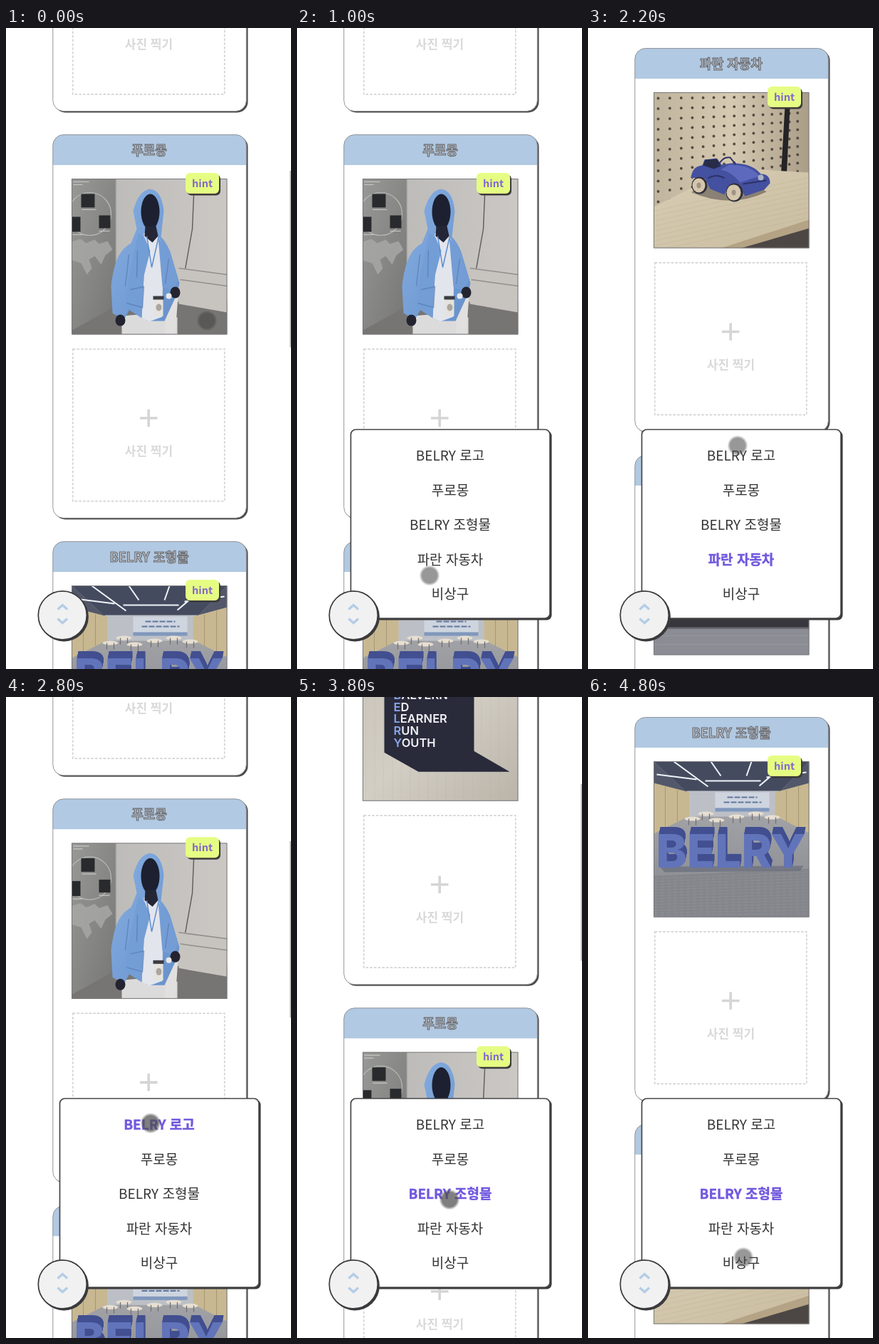
These frames come from a looping animation (400x898 px, 4900 ms). An HTML page:

```html
<!DOCTYPE html>
<html lang="ko">
<head>
<meta charset="utf-8">
<style>
html, body { margin: 0; width: 100%; height: 100%; overflow: hidden; background: #fff; }
svg { display: block; width: 100vw; height: 100vh; }
text { font-family: 'Noto Sans CJK KR', 'Noto Sans CJK', 'Noto Sans', sans-serif; text-anchor: middle; }
.title { font-size: 18px; font-weight: 700; fill: #bcc4ce; stroke: #67676b; stroke-width: 1.1; }
.hint { font-size: 14.5px; font-weight: 700; fill: #8068cf; }
.shoot { font-size: 17px; font-weight: 700; fill: #d9d9d9; }
.item { font-size: 19px; fill: #333; }
.item.on { font-weight: 700; fill: #7259df; stroke: #7259df; stroke-width: .4; }
.board { font: 600 16.5px Inter, sans-serif; fill: #f1f1f4; text-anchor: start; }
.sign { font: 800 65px Inter, sans-serif; }
</style>
</head>
<body>
<svg id="stage" viewBox="0 0 400 898">
  <defs>
    <clipPath id="photo"><rect width="218" height="218"/></clipPath>
    <linearGradient id="wood" x2="1" y2="1"><stop stop-color="#c9c3b8"/><stop offset=".5" stop-color="#d3cec4"/><stop offset="1" stop-color="#bab4a9"/></linearGradient>
    <linearGradient id="wall" x2="1" y2="0"><stop stop-color="#b8b7b5"/><stop offset="1" stop-color="#cbc8c4"/></linearGradient>
    <linearGradient id="greyWall" x2="1" y2="1"><stop stop-color="#989896"/><stop offset="1" stop-color="#767674"/></linearGradient>
    <linearGradient id="hoodie" x2="1" y2="1"><stop stop-color="#86afe3"/><stop offset="1" stop-color="#6690ca"/></linearGradient>
    <linearGradient id="floor" x2="0" y2="1"><stop stop-color="#b0b1b5"/><stop offset="1" stop-color="#85868b"/></linearGradient>
    <linearGradient id="peg" x2="1" y2="0"><stop stop-color="#bfb49d"/><stop offset=".5" stop-color="#d5c9b1"/><stop offset="1" stop-color="#a99d88"/></linearGradient>
    <linearGradient id="shelf" x2="1" y2="1"><stop stop-color="#d8cdb5"/><stop offset="1" stop-color="#c9bc9f"/></linearGradient>
    <radialGradient id="touch"><stop offset=".72" stop-color="#4d4d4d"/><stop offset="1" stop-color="#4d4d4d" stop-opacity="0"/></radialGradient>
  </defs>
  <g id="list"></g>
  <rect id="bar" x="398.3" width="2" height="247.5" fill="#aaa"/>
  <g id="menu">
    <rect x="77.5" y="564.5" width="280" height="265" rx="7" fill="#3b3a3d"/>
    <rect x="75.5" y="562.5" width="279.5" height="264.5" rx="7" fill="#fff" stroke="#454447" stroke-width="1.7"/>
    <g id="items"></g>
  </g>
  <circle cx="81.3" cy="824.8" r="34.6" fill="#3b3a3d"/>
  <circle cx="79.3" cy="822.8" r="34" fill="#f1f1f1" stroke="#3b3a3d" stroke-width="1.7"/>
  <path d="M72.5 814.5l6.8-6 6.8 6M72.5 827.5l6.8 6 6.8-6" fill="none" stroke="#b4cde6" stroke-width="3.4"/>
  <circle id="cursor" r="14.5" fill="url(#touch)"/>
</svg>
<script>
const $ = id => document.getElementById(id);
const range = (n, f) => Array.from({ length: n }, (_, i) => f(i)).join('');
const rect = (x, y, w, h, fill, more = '') => `<rect x="${x}" y="${y}" width="${w}" height="${h}" fill="${fill}" ${more}/>`;
const path = (d, fill, more = '') => `<path d="${d}" fill="${fill}" ${more}/>`;
const line = (d, color, w = 1, more = '') => path(d, 'none', `stroke="${color}" stroke-width="${w}" ${more}`);
const oval = (x, y, rx, ry, fill, more = '') => `<ellipse cx="${x}" cy="${y}" rx="${rx}" ry="${ry}" fill="${fill}" ${more}/>`;
const text = (cls, x, y, s, more = '') => `<text class="${cls}" x="${x}" y="${y}" ${more}>${s}</text>`;

const names = ['BELRY 로고', '푸로몽', 'BELRY 조형물', '파란 자동차', '비상구'];

function boardPhoto() {
  const words = ['BALVERN', 'ED', 'LEARNER', 'RUN', 'YOUTH'];
  return rect(0, 0, 218, 218, 'url(#wood)')
    + range(18, i => line(`M${i * 12.5 + 4} 0v218`, '#b5afa5', .6, 'opacity=".4"'))
    + path('M30 28H156V148L206 177H78L30 150Z', '#292b3b')
    + words.map((w, i) => text('board', 43, 75 + i * 16.8,
        `<tspan fill="#8ba5ec">${w[0]}</tspan>${w.slice(1)}`)).join('');
}

function hoodiePhoto() {
  const squares = [[13, 21, 19, 19], [0, 53, 12, 21], [38, 51, 16, 18]];
  return rect(0, 0, 218, 218, 'url(#wall)')
    + path('M0 208L62 172H218V218H0Z', '#777573')
    + path('M0 0H62V178L0 212Z', 'url(#greyWall)')
    + line('M62 0V176', '#a9a9a7', 1.5)
    + `<circle cx="25" cy="49" r="30" fill="none" stroke="#b9b9b7" stroke-width="1.2"/>`
    + squares.map(q => rect(...q, '#292a2d')).join('')
    + line('M2 4h22M2 8h13M14 43h20M38 73h15M1 78h14', '#c8c8c6', 1.2)
    + path('M0 88l12-4 8 6 12-5 6 6 12-4 7 12-10 8-6 13-9-12-8 5 4 12-7 9-8-16-13-4Z', '#a9aaa7', 'opacity=".8"')
    + line('M172 0L169 70 158 132', '#5d5b5a', 1.4)
    + path('M150 124L218 133V187L150 175Z', '#c7c4bf') + line('M150 125L218 134M152 141L218 150', '#918f8d', 1.5)
    + path('M70 192Q108 187 148 194V218H70Z', '#dcdbdc')
    + path('M134 160L150 150 145 218H130Z', '#e1e0df')
    + path('M91 70L83 90C65 100 59 119 55 150L57 188 73 197 82 181 106 199H130L148 160 151 146 138 102Q132 88 125 81L129 45Q126 15 109 14Q93 17 86 45Z', 'url(#hoodie)')
    + path('M101 76H119L128 94 127 193 108 200 98 194 102 120Z', '#e3e5ec')
    + oval(110, 46, 13, 25, '#1d2030')
    + path('M103 66H118L121 80 113 89 102 80Z', '#242635')
    + path('M93 76L102 82 110 101 101 136 98 195 75 180 79 145Z', '#739dd5')
    + path('M121 82L138 105 149 142 142 157 127 151Z', '#749dd5')
    + line('M80 106L75 150M82 155L101 151 99 180 77 174M136 112L131 147M92 100L91 138', '#5479af', 1.4, 'opacity=".65"')
    + line('M105 80L112 124 122 80', '#5d8dd1', 1.5)
    + rect(115, 165, 13, 27, '#e6e3de') + rect(114, 164, 15, 5, '#3b3b43') + oval(122, 180, 4, 5, '#aaa69e')
    + oval(68, 198, 7, 8, '#232430') + oval(145, 159, 7, 8, '#232430')
    + oval(136, 164, 4, 4, '#e9e9e9');
}

function signPhoto() {
  const depth = range(10, i => text('sign', 110 - i * .2, 138 + i, names[2].slice(0, 5), 'fill="#424f90"'));
  return rect(0, 0, 218, 218, 'url(#floor)')
    + path('M0 0H218L176 43H46Z', '#454b5f') + path('M0 0V34L46 43ZM218 0V34L176 43Z', '#525869')
    + line('M28 0L76 35M80 0L94 20M137 0L130 20M188 0L148 34M4 18L60 25M158 22L214 15M72 27H150', '#eef3fa', 2)
    + rect(46, 41, 130, 36, '#bcc0c6')
    + path('M0 30L50 43V76L0 101ZM218 30L170 43V76L218 100Z', '#c8b891')
    + line('M16 35V92M33 40V84M203 35V93M186 40V85', '#a69874', 1)
    + rect(86, 43, 76, 22, '#ced5df') + rect(86, 65, 76, 5, '#8098bd')
    + line('M103 50h42M98 57h53', '#63779f', 2.2, 'stroke-dasharray="8 2"')
    + [[73, 73], [88, 82], [116, 77], [143, 73], [54, 80], [166, 78]].map(([x, y]) =>
        oval(x, y, 11, 3, '#e6dfd2') + line(`M${x - 5} ${y}v9m10-9v9`, '#766f6b', 1.3)).join('')
    + path('M0 160L218 150V218H0Z', '#85868c')
    + range(15, i => line(`M0 ${164 + i * 4}L218 ${155 + i * 4.4}`, '#a2a3a8', .8, 'opacity=".45" stroke-dasharray="6 3"'))
    + path('M8 147L210 146 205 153 15 155Z', '#626777', 'opacity=".6"')
    + depth + text('sign', 108, 148, names[2].slice(0, 5), 'fill="#6174ba"');
}

function carPhoto() {
  const dots = range(15, i => range(11, j => {
    const x = 6 + i * 16.5 - i * i * .18, y = 8 + j * (14.5 - i * .2) - i * .2;
    return oval(x.toFixed(1), y.toFixed(1), 1.9, 2, '#554b42');
  }));
  const wheel = (x, y, r) => oval(x, y, r, r + 1, '#30303b') + oval(x - 1, y, r - 2, r - 1, '#d5c6ae') + oval(x - 1, y, 3, 4, '#a19482');
  return rect(0, 0, 218, 218, 'url(#peg)') + dots
    + path('M185 0H192L186 122H178Z', '#242326')
    + path('M0 160L64 128 150 108 218 112V218H0Z', 'url(#shelf)')
    + range(9, i => line(`M0 ${166 + i * 7}Q90 ${146 + i * 7} 218 ${119 + i * 7}`, '#b4a386', .8, 'opacity=".35"'))
    + path('M94 218L218 178V190L122 218Z', '#b4a384') + path('M122 218L218 190V218Z', '#4c4744')
    + path('M53 140Q109 163 158 139L148 132 63 128Z', '#665d57', 'opacity=".65"')
    + path('M52 119Q54 103 68 102L71 94 88 92 95 101 108 99Q137 98 150 114Q163 114 163 127L155 136 128 145 120 132Q104 124 99 143L79 135 72 121Z', '#4450a0')
    + path('M106 101Q136 101 148 117L121 126Q109 111 94 108Z', '#5d69bd')
    + path('M69 102L72 94 89 93 94 103 84 107Z', '#292c48')
    + line('M90 103Q96 89 107 91L115 101M76 120Q88 113 99 120M125 128L158 123', '#2c3264', 2)
    + wheel(64, 130, 11) + wheel(113, 140, 12) + oval(150, 119, 4, 4, '#aab0c4');
}

function exitPhoto() {
  return rect(0, 0, 218, 218, '#c9c9ca') + rect(30, 30, 158, 140, '#55565c')
    + rect(0, 168, 218, 14, '#36363c') + rect(0, 181, 218, 37, '#8c8c94')
    + line('M0 180H218', '#6c6c74', 2) + line('M0 191H218M0 203H218', '#96969e', 1);
}

const photos = [boardPhoto, hoodiePhoto, signPhoto, carPhoto, exitPhoto];

const card = (name, i) => `<g transform="translate(0 ${i * 570})">`
  + rect(68, 2.5, 271.5, 537, '#4b4a4c', 'rx="15"')
  + rect(65.8, .5, 271.5, 537, '#fff', 'rx="15"')
  + path('M65.8 43V15.5a15 15 0 0 1 15-15H322.3a15 15 0 0 1 15 15V43Z', '#b1c9e2')
  + rect(65.8, .5, 271.5, 537, 'none', 'rx="15" stroke="#8b8c90" stroke-width=".9"')
  + text('title', 201, 29, name)
  + `<g transform="translate(92.5 62.5)"><g clip-path="url(#photo)">${photos[i]()}</g>`
  + rect(0, 0, 217.5, 217.5, 'none', 'stroke="#77777a" stroke-width="1"') + '</g>'
  + rect(254, 56.5, 47, 29, '#3b3b3b', 'rx="6"') + rect(252, 54, 47, 29, '#e6fd83', 'rx="6"')
  + text('hint', 275.5, 74, 'hint')
  + rect(93.8, 300.8, 213, 213, 'none', 'stroke="#d4d4d4" stroke-width="1.7" stroke-dasharray="3.5 2.2"')
  + line('M188 397.5h24.5M200.2 385.2v24.5', '#d5d5d5', 3.6)
  + text('shoot', 200.5, 450, '사진 찍기') + '</g>';

$('list').innerHTML = names.map(card).join('');
$('items').innerHTML = names.map((n, i) => text('item', 215, 606 + i * 48.5, n)).join('');

const LOOP = 4900, START_Y = -421;
const jumps = [
  { at: 1254.5, dur: 560, to: -1682, item: 3 },
  { at: 2415.5, dur: 600, to: 28, item: 0 },
  { at: 3654, dur: 560, to: -1112, item: 2 },
];
// time, x, y
const trail = [
  [0, 282, 410], [420, 80, 823], [600, 80, 823], [1000, 186, 767], [1220, 215, 743], [1650, 215, 743],
  [2200, 210, 585], [2380, 203, 597], [2850, 203, 597], [3580, 214, 704], [3850, 214, 704],
  [4800, 218, 785], [4900, 218, 788],
];
const clamp = v => Math.min(1, Math.max(0, v));

// cubic-bezier(.42, 0, .58, 1)
function easeInOut(x) {
  let lo = 0, hi = 1;
  for (let i = 0; i < 20; i++) {
    const u = (lo + hi) / 2, v = 1 - u;
    if (3 * v * v * u * .42 + 3 * v * u * u * .58 + u ** 3 < x) lo = u; else hi = u;
  }
  return 3 * lo * lo - 2 * lo ** 3;
}

function cursorAt(t) {
  const i = Math.max(1, trail.findIndex(p => p[0] > t));
  const [a, b] = [trail[i - 1], trail[i]];
  const k = clamp((t - a[0]) / (b[0] - a[0]));
  const e = k * k * (3 - 2 * k);
  return [a[1] + (b[1] - a[1]) * e, a[2] + (b[2] - a[2]) * e];
}

function render(t) {
  let y = START_Y, active = -1, barEnd = -50;
  for (const j of jumps) {
    if (t < j.at) break;
    y += (j.to - y) * easeInOut(clamp((t - j.at) / j.dur));
    active = j.item;
    barEnd = j.at + j.dur;
  }
  $('list').setAttribute('transform', `translate(0 ${y.toFixed(2)})`);
  $('bar').setAttribute('y', 200 + (START_Y - y) * .2724);
  $('bar').setAttribute('opacity', .8 * (1 - clamp((t - barEnd - 180) / 180)));
  $('menu').setAttribute('visibility', t < 500 ? 'hidden' : 'visible');
  [...$('items').children].forEach((el, i) => el.classList.toggle('on', i === active));
  const [cx, cy] = cursorAt(t);
  const pressed = t < 100 || (t > 430 && t < 560) || jumps.some(j => t > j.at - 60 && t < j.at + 420);
  $('cursor').setAttribute('transform', `translate(${cx} ${cy})`);
  $('cursor').setAttribute('opacity', pressed ? .72 : .58);
}

const began = performance.now();
function tick() {
  render((performance.now() - began) % LOOP);
  requestAnimationFrame(tick);
}
tick();
</script>
</body>
</html>
```
